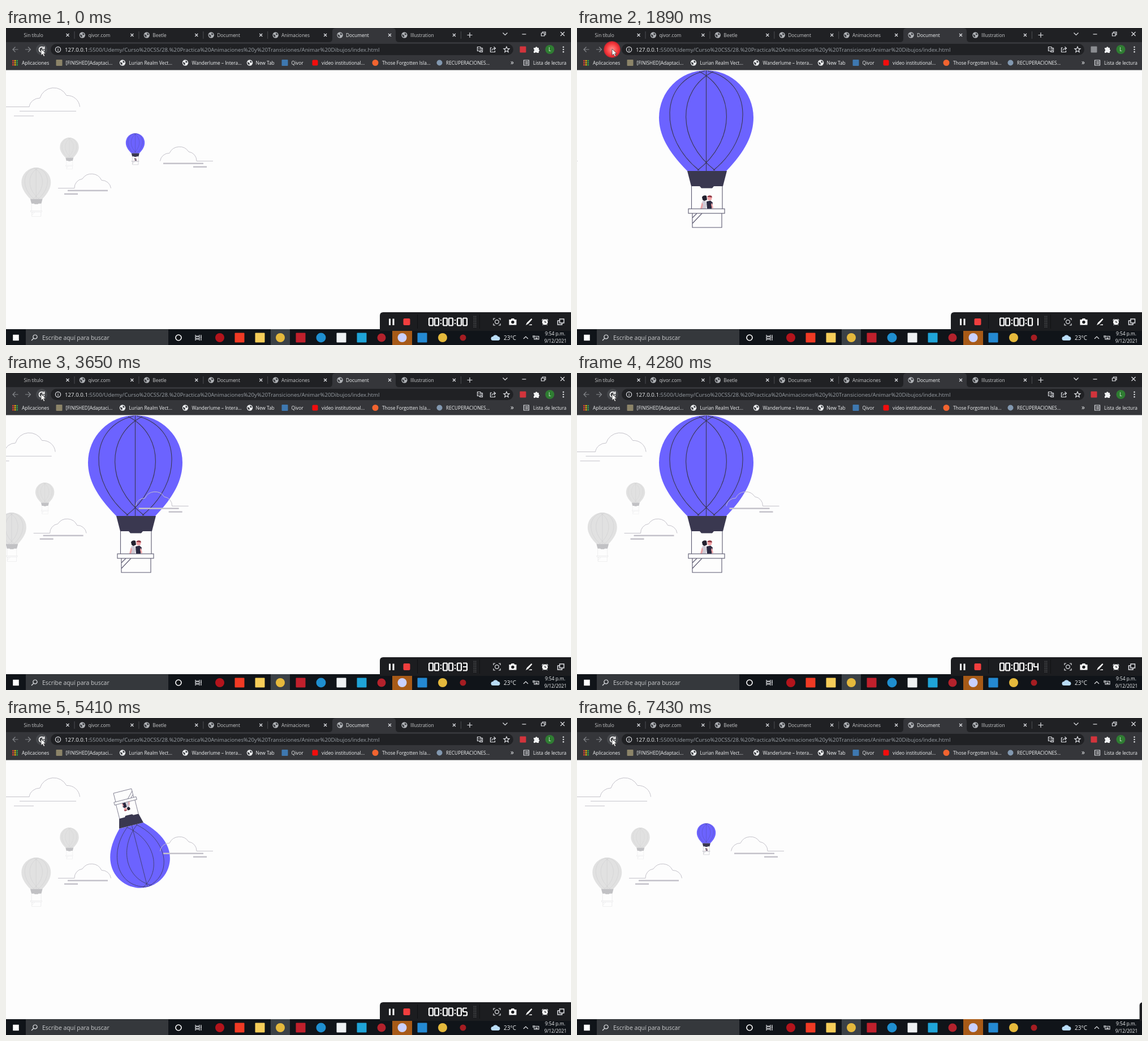
Animation of 999x561 px, one loop 7.56 s. Source, as an HTML page:

```html
<!DOCTYPE html>
<html lang="es">
<head>
<meta charset="utf-8">
<title>Globos</title>
<style>
  html, body { margin: 0; width: 100%; height: 100%; overflow: hidden; background: #fdfdfd; }
  svg { display: block; width: 100%; height: 100%; }
  text { font-family: "Open Sans", "Noto Sans", sans-serif; font-size: 8.35px; fill: #f1f3f4; white-space: pre; }
  .line { fill: none; stroke: #dfe1e5; stroke-width: 1.2; }
  .dim { stroke: #85878b; }
  .cloud { fill: none; stroke: #c4c2ca; stroke-width: 1; }
  .cloud .bar { stroke-width: 2.6; }
  .balloon { fill: none; stroke: var(--ink); stroke-width: 1.1; }
  .balloon .skin { fill: var(--skin); stroke: none; }
  .balloon .collar { fill: var(--ink); stroke: none; }
  .balloon .basket { stroke: var(--frame); }
  .balloon .deck { fill: #fdfdfd; }
  .blue { --skin: #6c63ff; --ink: #3a3850; --frame: #5b5970; }
  .gray { --skin: #e1e1e1; --ink: #c1c1c4; --frame: #d2d2d5; }
</style>
</head>
<body>
<svg id="stage" viewBox="0 0 999 561" preserveAspectRatio="none"></svg>
<script>
const LOOP = 7560, STEP = 126;
const RELOAD = 1750, FLY_IN = 1865, SPIN = FLY_IN + 3000, HIDE_PANEL = 5905;
const TICKS = [1120, 2630, 3130, 4130, 5150];

const rect = (x, y, w, h, fill, r = 0) =>
  `<rect x="${x}" y="${y}" width="${w}" height="${h}" rx="${r}" fill="${fill}"/>`;
const disc = (x, y, r, fill) => `<circle cx="${x}" cy="${y}" r="${r}" fill="${fill}"/>`;
const square = (x, y, size, fill, r = 1) => rect(x - size / 2, y - size / 2, size, size, fill, r);
const text = (x, y, str, attrs = "") => `<text x="${x}" y="${y}" ${attrs}>${str}</text>`;
// Outline icon drawn around its own centre
const icon = (x, y, d, cls = "", style = "") =>
  `<path class="line ${cls}" transform="translate(${x} ${y})" d="${d}" style="${style}"/>`;
const ring = r => `M${-r} 0a${r} ${r} 0 1 1 ${2 * r} 0a${r} ${r} 0 1 1 ${-2 * r} 0`;
const CROSS = "M-2.5 -2.5L2.5 2.5M2.5 -2.5L-2.5 2.5";

const globe = (x, y, fill = "#c3c6ca") => disc(x, y, 5.2, fill) +
  `<path transform="translate(${x} ${y})" fill="#3a3c40" d="M-4 -1.5L-1 0L0 1.5L-1 4Q-4.5 2 -4 -1.5M0 -4Q3 -3.5 4 -1L2 0L0 -1L1 -2.4Z"/>`;

function tabStrip() {
  const titles = ["Sin título", "qivor.com", "Beetle", "Document", "Animaciones", "Document", "Illustration"];
  let out = rect(0, 0, 999, 26, "#202124") +
    `<path fill="#35363a" d="M571 25Q577 25 577 19V6Q577 0 583 0H683Q689 0 689 6V19Q689 25 695 25Z"/>`;
  titles.forEach((title, i) => {
    const x = 33 + i * 113.9;
    if (i) out += globe(x - 12, 12.5, "#aeb1b5");
    out += text(x - 1.5, 15.5, title, i == 5 ? "" : 'fill-opacity=".8"') + icon(x + 76, 12.5, CROSS);
    if (i < 4 || i == 6) out += rect(x + 87.5, 6, 1, 13, "#4c4e52");
  });
  return out + icon(820, 12.5, "M-4.5 0H4.5M0 -4.5V4.5") + icon(882.5, 10.5, "M-4 -2L0 2L4 -2") +
    icon(916, 11, "M-3.5 0H3.5") + icon(950, 10.5, "M-3.5 -1.5H2V3.5H-3.5ZM-1.5 -1.5V-3.5H4V1.5H2") +
    icon(984, 10.5, "M-3.5 -3.5L3.5 3.5M3.5 -3.5L-3.5 3.5");
}

function toolbar() {
  const path = "/Udemy/Curso%20CSS/28.%20Practica%20Animaciones%20y%20Transiciones/Animar%20Dibujos/index.html";
  return rect(0, 25, 999, 49.5, "#35363a") + rect(79, 28, 818, 20, "#202124", 10) +
    icon(16.5, 38, "M5 0H-4.5M0 -4.5L-4.5 0L0 4.5", "dim") + icon(39, 38, "M-5 0H4.5M0 -4.5L4.5 0L0 4.5", "dim") +
    disc(63, 38, 10, "#47494d").replace("<circle", '<circle id="hover"') +
    icon(63, 38, "M3.2 -3.2A4.6 4.6 0 1 0 4.6 1M4.6 -5.2V-1.4H.8", "", "stroke:#fff;stroke-width:1.7") +
    icon(92, 38, ring(4.6) + "M0 -.5V2.6M0 -2.6V-1.6") +
    text(104, 41.5, `127.0.0.1<tspan fill="#9aa0a6">:5500${path}</tspan>`, 'style="font-size:9.7px"') +
    icon(838, 38, "M-4.5 -4.5H1L2.5 2.5H-4.5ZM2 -2.5H4.5V4.5H0L-1 2.5M-3 -1H0") +
    icon(861, 38, "M-2 -3H-4.5V4.5H3.5V2M-2 2Q-1.5 -2 4 -2M1.5 -4.8L4.5 -2L1.5 .8") +
    icon(885, 38, "M0 -5L1.4 -1.6L5 -1.3L2.2 1L3.1 4.6L0 2.6L-3.1 4.6L-2.2 1L-5 -1.3L-1.4 -1.6Z") +
    square(914, 38, 11, "#d3343c", 1).replace("<rect", '<rect id="shield"') +
    `<path fill="#f1f3f4" d="M933 35H936A1.8 1.8 0 0 1 939.6 35H942V38A1.8 1.8 0 0 1 942 41.4V44H938.6A1.8 1.8 0 0 0 935.4 44H933V41A1.8 1.8 0 0 0 933 37.6Z"/>` +
    disc(961.5, 38, 8, "#2f7d32") + text(961.5, 41.2, "L", 'text-anchor="middle"') +
    [33.7, 38, 42.3].map(y => disc(985.5, y, 1.2, "#e8eaed")).join("");
}

function bookmarks() {
  const colors = ["#ea4335", "#fbbc04", "#34a853", "#4285f4"];
  let out = "";
  for (let i = 0; i < 9; i++)
    out += square(12.5 + i % 3 * 3.6, 58 + (i / 3 | 0) * 3.6, 2.4, colors[(i + (i / 3 | 0)) % 4], 0);
  [[28, "Aplicaciones"], [105.5, "[FINISHED]Adaptaci..."], [217.5, "Lurian Realm Vect..."],
   [328.5, "Wanderlume – Intera..."], [441.5, "New Tab"], [504.5, "Qivor"], [558, "video institucional...".replace("cional", "tional")],
   [665, "Those Forgotten Isla..."], [778, "RECUPERACIONES..."], [932, "Lista de lectura"]]
    .forEach(([x, label]) => out += text(x, 64.7, label));
  return out + square(94, 61.5, 11, "#8c8468") + [206, 317, 431].map(x => globe(x, 61.5, "#eceef0")).join("") +
    square(493, 61.5, 11, "#3e78b0") + square(546.5, 61.5, 10, "#f20d0d", 2) + disc(653, 61.5, 5.5, "#f26430") +
    disc(766.5, 61.5, 5, "#8298b0") + text(892, 65, "»", 'style="font-size:12px"') +
    icon(920, 61.5, "M-4.5 -4.5H4.5V4.5H-4.5ZM-1.5 -2H3M-1.5 0H3M-1.5 2H3M-3 -2H-2.4M-3 0H-2.4M-3 2H-2.4");
}

function taskbar() {
  const apps = [[413, "#f03a24"], [449, "#f6cd59"], [521, "#c0202c"], [593, "#eef1f3"], [629, "#1fa4d8"], [736, "#2489d2"]];
  const round = [[378, "#b3141c", 8], [485, "#e5b93c", 8], [557, "#1f8fd0", 8.5], [664, "#b3222c", 7.5],
    [700.5, "#c9d0ff", 8], [772, "#e5b93c", 8], [808, "#a51d22", 5.5]];
  return rect(0, 533, 999, 28, "#101419") + rect(35, 533.5, 252, 28, "#35383c") +
    rect(468, 533, 34, 28, "#3b4146") + rect(683, 533, 35, 28, "#a75a17") +
    square(17.5, 548, 10.5, "#fff", 0) +
    icon(50, 548, "M1.5 -5A3.6 3.6 0 1 1 1.4 -5M-1 1L-5 5") +
    text(64, 551.8, "Escribe aquí para buscar", 'style="font-size:10.4px" fill-opacity=".8"') +
    icon(305, 548, ring(5), "", "stroke:#fff;stroke-width:1.6") +
    icon(340, 548, "M-5 -5V-3H2V-5M-5 5V3H2V5M-5 -1.5H2V1.5H-5ZM5 -5V5M4 -1H6") +
    apps.map(([x, fill]) => square(x, 548, 17, fill)).join("") +
    round.map(([x, fill, r]) => disc(x, 548, r, fill)).join("") +
    `<path fill="#b9dcf8" d="M861 553A3.5 3.5 0 0 1 861 546A5 5 0 0 1 870 546A3.6 3.6 0 0 1 871 553Z"/>` +
    text(880, 552, "23°C", 'style="font-size:10px"') + icon(919, 548, "M-4 2L0 -2L4 2") +
    icon(937, 548, "M-3 -2.5H5V3H-3ZM-5 -4V0M-3 -4V0M-1 0H3M-1 1.5H3") +
    text(971, 544.3, "9:54 p.m.", 'text-anchor="middle"') + text(971.5, 557, "9/12/2021", 'text-anchor="middle"');
}

const recorder = () => `<g id="panel">
  <path fill="#1c1d20" d="M661 536V509Q661 503 667 503H1005V536Z"/>` +
  rect(677, 514.5, 3, 11.5, "#fff") + rect(683.5, 514.5, 3, 11.5, "#fff") + rect(702.5, 514, 12, 12, "#f03e3e", 2) +
  rect(727, 507, 1, 25, "#101113") + rect(837, 507, 1, 25, "#101113") +
  Array.from({ length: 14 }, (_, i) => square(827.5 + i % 2 * 3, 510.5 + (i >> 1) * 3.1, 1.8, "#4a4b4e", 0)).join("") +
  icon(868, 520, ring(3.4) + "M-6 -3V-6H-3M3 -6H6V-3M6 3V6H3M-3 6H-6V3") +
  `<path fill="#fff" fill-rule="evenodd" d="M889.5 516H892.5L894 514H898L899.5 516H902.5V525.5H889.5ZM893.2 520.5a2.8 2.8 0 1 0 5.6 0a2.8 2.8 0 1 0 -5.6 0"/>` +
  `<path fill="#fff" d="M919 526L921 521.5L929 514L930.5 515.5L923.5 523.5ZM924 526L927 524.5H930V526Z"/>` +
  disc(953, 520.5, 5, "#fff") + icon(953, 520.5, "M-5.5 -3L-3 -5.5M5.5 -3L3 -5.5M-4 5.5L-3 4M4 5.5L3 4") +
  icon(953, 520.5, "M0 -2.5V.5H2.5", "", "stroke:#1c1d20") +
  icon(981, 520, "M-2 -5H5.5V2H-2ZM-2 -2H-5.5V5H2V2", "", "stroke-width:1.5") +
  `<path id="clock" fill="none" stroke="#fff" stroke-width="2.2"/></g>`;

const cloud = `<g class="cloud"><path d="M272.5 235.5A16 16 0 0 1 289 221.5A19.5 19.5 0 0 1 323 219A16 16 0 0 1 337 235.5H366"/>
  <path class="bar" d="M278 239.7H349M331 245.8H355"/></g>`;
const bigCloud = `<g class="cloud"><path d="M0 139.5H41A19 18 0 0 1 60 124A25.5 25.5 0 0 1 107 119.5A22 22 0 0 1 130.5 139.5M24 147.2H124M14 155.7H49"/></g>`;

const stripes = "M226 76C145 95 145 195 216 252M241 77C176 110 176 200 244 252";
const balloon = (cls, crew = "") => `<g class="balloon ${cls}">
  <path class="skin" d="M195 253C160 218 145 188 145 158.5A83.5 83.5 0 0 1 312 158.5C312 188 298 218 264 253Z"/>
  <path d="M228.5 75V253${stripes}"/><path transform="translate(457 0) scale(-1 1)" d="${stripes}"/>
  <path class="collar" d="M195 253H265L258 280H242L239 283.5H220L217 280H202Z"/>
  <path class="basket" d="M202.5 280V320M257 280V320M204 328V353H256V328M204 336L212 328M204 346L221 328"/>${crew}
  <rect class="basket deck" x="197" y="320" width="64" height="8"/></g>`;
const crew = `<g stroke="none"><path fill="#cfcbd6" d="M222 306L227 304L229 312L228 320H219Z"/>
  <path fill="#e8a0a4" d="M221 308L218 320H221L223 313Z"/>
  <path fill="#22202e" d="M221 299Q224 295 229 297L230 304L225 306L222 304Z"/>
  <circle cx="234.5" cy="301" r="4" fill="#f2a3a6"/><path fill="#8f3540" d="M230 299Q232 295 238 297L239 300L232 299Z"/>
  <path fill="#2b2940" d="M229 307L236 305.5L240 309L238 320H230Z"/><path fill="#f2a3a6" d="M238 309L241 318L239 320L237 313Z"/></g>`;

const stage = document.getElementById("stage");
stage.innerHTML = `<defs><radialGradient id="glow"><stop stop-color="#ff9292"/><stop offset=".6" stop-color="#fa4343"/>
    <stop offset=".9" stop-color="#e02630"/><stop offset="1" stop-color="#e02630" stop-opacity=".3"/></radialGradient></defs>` +
  rect(0, 74, 999, 459, "#fdfdfd") + `<g id="main">${balloon("blue", crew)}</g><g id="sky">${bigCloud}
    <g transform="translate(66.3 179) scale(.2)">${balloon("gray")}</g>
    <g transform="translate(-17.8 223.7) scale(.311)">${balloon("gray")}</g>
    ${cloud}<g transform="translate(458 48) scale(-1 1)">${cloud}</g></g>` +
  tabStrip() + toolbar() + bookmarks() + taskbar() + recorder() +
  disc(62, 38, 15, "url(#glow)").replace("<circle", '<circle id="click"') +
  `<path fill="#fff" stroke="#222" stroke-width=".7" d="M62 37V48.5L64.7 46L66.6 50.3L68.7 49.4L66.8 45.2H70.3Z"/>`;

const part = Object.fromEntries([...stage.querySelectorAll("[id]")].map(el => [el.id, el]));

// cubic-bezier(.25, .1, .25, 1)
function ease(x) {
  if (x <= 0) return 0;
  if (x >= 1) return 1;
  let lo = 0, hi = 1, s;
  for (let i = 0; i < 30; i++) {
    s = (lo + hi) / 2;
    const bx = .75 * s * (1 - s) + s ** 3;
    if (bx < x) lo = s; else hi = s;
  }
  return .3 * s * (1 - s) ** 2 + 3 * s * s * (1 - s) + s ** 3;
}

// Seven segments: top, upper right, lower right, bottom, lower left, upper left, middle
const SEGMENTS = ["M0 0h7", "M7 0v6.5", "M7 6.5v6.5", "M0 13h7", "M0 6.5v6.5", "M0 0v6.5", "M0 6.5h7"];
const DIGITS = ["012345", "12", "01346", "01236", "1256", "02356"];
function clockPath(seconds) {
  let d = "M769 516v2M769 522v2M794 516v2M794 522v2";
  [0, 10, 25, 35, 50, 60].forEach((dx, i) => {
    for (const s of DIGITS[i == 5 ? seconds : 0])
      d += SEGMENTS[s].replace(/M(\S+) (\S+?)(?=[hv])/, (_, x, y) => `M${748 + dx + +x} ${513.5 + +y}`);
  });
  return d;
}

function draw(now) {
  const t = Math.max(0, Math.floor((now % LOOP + 10) / STEP) * STEP - 5);
  const reloaded = t >= RELOAD;
  const spin = reloaded ? ease((t - SPIN) / 2000) : 1;
  const slide = reloaded ? 366 * (ease((t - FLY_IN) / 3000) - 1) : 0;
  const hidden = 338 * (1 - Math.exp(-Math.max(0, t - HIDE_PANEL) / 350));
  part.main.setAttribute("transform",
    `translate(228.5 214) rotate(${360 * spin}) scale(${1 - .8 * spin}) translate(-228.5 -214)`);
  part.sky.setAttribute("transform", `translate(${slide} 0)`);
  part.panel.setAttribute("transform", `translate(${hidden} 0)`);
  part.clock.setAttribute("d", clockPath(TICKS.filter(tick => t >= tick).length));
  part.click.style.display = reloaded && t < 2130 ? "" : "none";
  part.hover.setAttribute("fill", t >= 1500 && !reloaded ? "#606266" : "#47494d");
  part.shield.setAttribute("fill", reloaded && t < 2400 ? "#8b8d91" : "#d3343c");
}

const start = performance.now();
function frame() {
  draw(performance.now() - start);
  requestAnimationFrame(frame);
}
frame();
</script>
</body>
</html>
```
